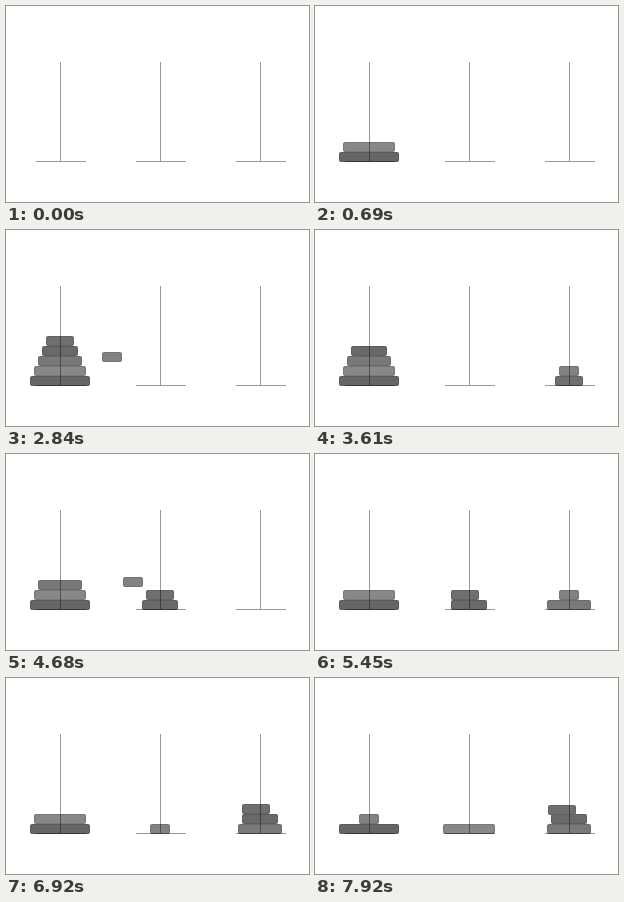
Animation of 303x196 px, one loop 8000 ms. Source, as an HTML page with a canvas:

```html
<!DOCTYPE html>
<html lang="en">
<head>
<meta charset="utf-8">
<title>Towers</title>
<style>
html, body { margin: 0; width: 100%; height: 100%; overflow: hidden; background: #fff; }
canvas { display: block; }
</style>
</head>
<body>
<canvas id="stage" width="303" height="196"></canvas>
<script>
const ctx = document.getElementById('stage').getContext('2d');
const LOOP = 8000, STEP = 1000 / 13, SLIDE = 300;
const PEGS = [54, 154, 254], FLOOR = 156, H = 10;

// Largest disc first
const DISCS = [
  { w: 60, fill: '#666', land: 134 },
  { w: 52, fill: '#888', land: 670 },
  { w: 44, fill: '#797979', land: 1221 },
  { w: 36, fill: '#696969', land: 1560 },
  { w: 28, fill: '#6f6f6f', land: 2123 },
  { w: 20, fill: '#828282', land: 2661 }
];

// Pace of the solving: [ms, moves made]
const PACE = [[2690, 0], [3615, 3.02], [4692, 6.652], [5461, 9.128],
  [6923, 13.91], [7923, 17.171], [8000, 17.42]];

const swing = p => 0.5 - 0.5 * Math.cos(Math.PI * Math.min(1, Math.max(0, p)));
const mix = (a, b, p) => a + (b - a) * p;

function solve(n, from, to, via) {
  if (!n) return [];
  return [...solve(n - 1, from, via, to), [from, to], ...solve(n - 1, via, to, from)];
}
const MOVES = solve(DISCS.length, 0, 2, 1);

function movesAt(t) {
  if (t <= PACE[0][0]) return 0;
  const i = Math.max(1, PACE.findIndex(p => p[0] >= t));
  const [t0, a] = PACE[i - 1], [t1, b] = PACE[i];
  return mix(a, b, (t - t0) / (t1 - t0));
}

const slot = (peg, level) => ({ x: PEGS[peg], y: FLOOR - H * (level + 1) });

function drawDisc(disc, x, y) {
  x = Math.round(x - disc.w / 2);
  y = Math.round(y);
  ctx.fillStyle = disc.fill;
  ctx.beginPath();
  ctx.roundRect(x, y, disc.w, H, 2);
  ctx.fill();
  ctx.strokeStyle = 'rgba(0,0,0,.12)';
  ctx.lineWidth = 1;
  ctx.beginPath();
  ctx.roundRect(x + 0.5, y + 0.5, disc.w - 1, H - 1, 2);
  ctx.stroke();
}

function drawPegs() {
  ctx.fillStyle = 'rgba(0,0,0,.4)';
  for (const x of PEGS) {
    ctx.fillRect(x, 56, 1, 99);
    ctx.fillRect(x - 24, 155, 50, 1);
  }
}

function draw(t) {
  ctx.fillStyle = '#fff';
  ctx.fillRect(0, 0, 303, 196);

  const made = movesAt(t), done = Math.floor(made);
  const stacks = [[...DISCS], [], []];
  for (const [from, to] of MOVES.slice(0, done)) stacks[to].push(stacks[from].pop());

  let moving = null;
  if (made > 0) {
    const [from, to] = MOVES[done];
    const a = slot(from, stacks[from].length - 1), b = slot(to, stacks[to].length);
    const p = swing(made - done);
    moving = { disc: stacks[from].pop(), x: mix(a.x, b.x, p), y: mix(a.y, b.y, p) };
  }

  stacks.forEach((stack, peg) => stack.forEach((disc, level) => {
    const { x, y } = slot(peg, level);
    const away = swing((disc.land - t) / SLIDE);
    drawDisc(disc, x - 280 * away, y - 196 * away);
  }));
  if (moving) drawDisc(moving.disc, moving.x, moving.y);
  drawPegs();
}

const start = performance.now();
function tick() {
  const t = Math.max(0, performance.now() - start) % LOOP;
  draw(Math.min(LOOP, Math.floor((t + 14) / STEP) * STEP));
  requestAnimationFrame(tick);
}
tick();
</script>
</body>
</html>
```
